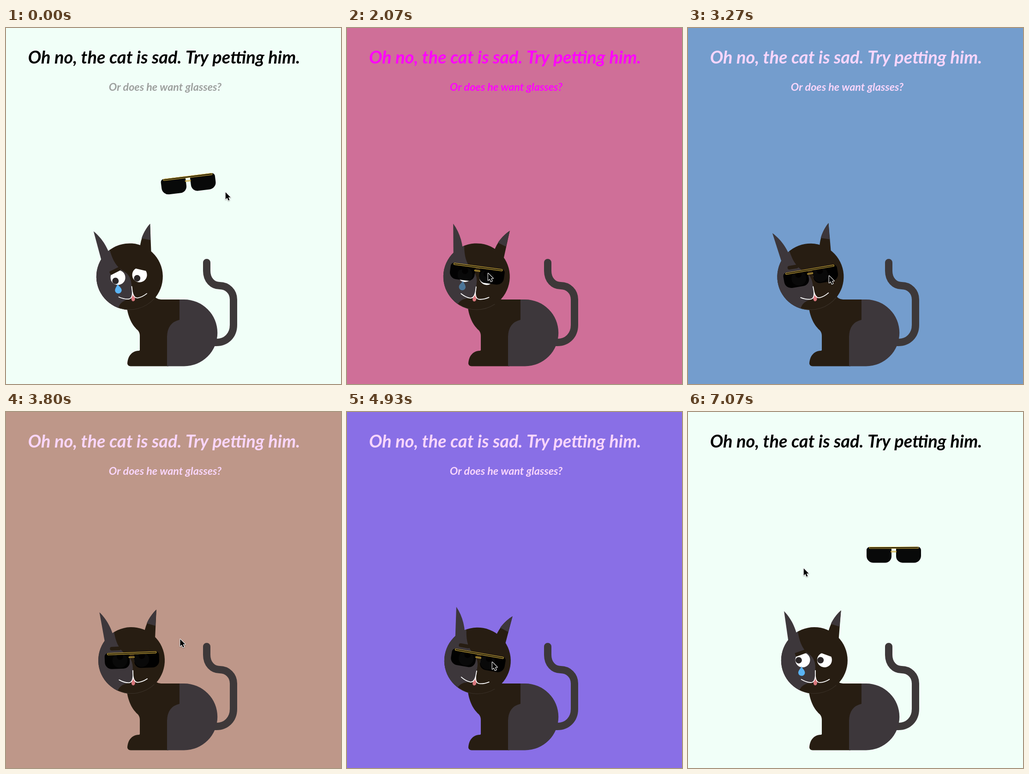
An HTML page with a canvas that plays this animation: 726 by 771 pixels, repeating every 7.14 s.

```html
<!DOCTYPE html>
<html lang="en">
<head>
<meta charset="utf-8">
<title>Sad cat</title>
<style>
html, body { margin: 0; width: 100%; height: 100%; overflow: hidden; background: #f1fff8; }
canvas { display: block; }
</style>
</head>
<body>
<canvas id="stage" width="726" height="771"></canvas>
<script>
const ctx = document.getElementById('stage').getContext('2d');
const LOOP = 7140, TURN = Math.PI * 2, DEG = Math.PI / 180;
const MINT = '#f1fff8', DARK = '#271d12', GREY = '#3d373b', GOLD = '#c9a53a';
const PIVOT = [274, 589];

// Background colours and the moment each one is reached.
const PARTY = [[1490, MINT], [2070, '#cf6f98'], [2600, '#ff78a9'], [3270, '#749dcd'],
  [4270, '#ff914d'], [4930, '#896fe6'], [5860, MINT]];

// Pointer moves: begin, end, destination.
const MOVES = [[0, 560, 425, 332], [820, 1480, 305, 536], [3500, 4200, 486, 423],
  [4330, 4900, 314, 541], [5270, 5850, 485, 312], [6100, 7050, 250, 338]];

const lerp = (a, b, u) => a + (b - a) * u;
const ramp = (t, from, to) => Math.min(1, Math.max(0, (t - from) / (to - from)));
const smooth = u => u * u * (3 - 2 * u);
const glide = (t, from, to) => smooth(ramp(t, from, to));
const during = (t, a, b, c, d) => glide(t, a, b) - glide(t, c, d);

// cubic-bezier(.25, .1, .25, 1)
function ease(x) {
  const curve = (s, p, q) => 3 * s * (1 - s) ** 2 * p + 3 * s * s * (1 - s) * q + s ** 3;
  let lo = 0, hi = 1;
  for (let i = 0; i < 20; i++) {
    const mid = (lo + hi) / 2;
    if (curve(mid, 0.25, 0.25) < x) lo = mid; else hi = mid;
  }
  return curve(lo, 0.1, 1);
}

// Rest, left, rest, right: one sway lasts three seconds.
function sway(t) {
  const q = ((t + 308) % 3000) / 750, i = Math.floor(q);
  const stop = n => -10 * Math.sin(n * Math.PI / 2);
  return lerp(stop(i), stop(i + 1), ease(q - i)) * DEG;
}

function mix(a, b, u) {
  const part = (hex, i) => parseInt(hex.slice(i, i + 2), 16);
  return '#' + [1, 3, 5].map(i => Math.round(lerp(part(a, i), part(b, i), u)).toString(16).padStart(2, '0')).join('');
}

function backColor(t) {
  return PARTY.reduce((color, [time, next], i) => i ? mix(color, next, ramp(t, PARTY[i - 1][0], time)) : next, MINT);
}

function textColor(t, calm) {
  const lively = mix('#ff00ff', '#f9d6fb', ramp(t, 2700, 3200));
  return mix(calm, lively, during(t, 1500, 1750, 5450, 5850));
}

function fill(d, color) {
  ctx.fillStyle = color;
  ctx.fill(new Path2D(d));
}

function line(d, color, width) {
  ctx.strokeStyle = color;
  ctx.lineWidth = width;
  ctx.stroke(new Path2D(d));
}

function disc(x, y, r, color) {
  ctx.fillStyle = color;
  ctx.beginPath();
  ctx.arc(x, y, r, 0, TURN);
  ctx.fill();
}

function box(x, y, w, h, radii, color) {
  ctx.fillStyle = color;
  ctx.beginPath();
  ctx.roundRect(x, y, w, h, radii);
  ctx.fill();
}

function within(x, y, r, draw) {
  ctx.save();
  ctx.beginPath();
  ctx.arc(x, y, r, 0, TURN);
  ctx.clip();
  draw();
  ctx.restore();
}

function placed(x, y, angle, draw) {
  ctx.save();
  ctx.translate(x, y);
  ctx.rotate(angle);
  draw();
  ctx.restore();
}

function text(str, x, y, size, color) {
  ctx.font = `italic 700 ${size}px Lato, "Open Sans", sans-serif`;
  ctx.textAlign = 'center';
  ctx.fillStyle = color;
  ctx.fillText(str, x, y);
}

function pose(t) {
  const worn = during(t, 820, 1480, 5270, 5850);
  return {
    angle: sway(t),
    worn,
    slip: -5.5 * worn * (1 - glide(t, 2150, 2500)),
    cheer: during(t, 2000, 2500, 5450, 5850),
    tear: 1 - during(t, 1500, 2650, 5450, 5850),
    gaze: (135 + 45 * t / LOOP + 115 * worn) * DEG
  };
}

function drawBody() {
  line('M435 508V526C435 546 448 558 463 558C480 558 493 571 493 588V643C493 666 477 681 456 681H440', '#3d3839', 16);
  fill('M262 590V606C266 632 276 646 286 655Q290 660 290 667V697Q290 699 287 699C272 700 264 711 263 727Q264 732 270 732.5H352V680L378 640V588H336Q325 588 318 576Z', DARK);
  fill('M376 588H386A72 72 0 0 1 386 732.5H349V668Q350 638 376 632Z', GREY);
}

function drawEye(x, side, { gaze, cheer }) {
  disc(x, 537, 16, '#fff');
  within(x, 537, 16, () => disc(x + 8.7 * Math.cos(gaze), 537.5 + 8.7 * Math.sin(gaze), 7, '#2b2627'));
  placed(x - side * (4.5 + 4 * cheer), 522 - 11 * cheer, -20 * side * DEG * (1 - cheer),
    () => box(-12, -4, 24, 8, 1 + 3 * cheer, DARK));
}

function drawHead(p) {
  placed(...PIVOT, p.angle, () => {
    ctx.translate(-PIVOT[0], -PIVOT[1]);
    fill('M332 430C318 442 308 460 304 478L327 490Z', DARK);
    fill('M332 430C322 439 314 450 310 459L328.5 465Z', GREY);
    disc(274, 538, 72, DARK);
    within(274, 538, 72, () =>
      fill('M200 460H237C239 490 245 511 262 524Q276 534 276 552V586C259 586 246 590 241 604L200 620Z', GREY));
    line('M321 592A72 72 0 0 1 244 603', '#3b3229', 1);
    fill('M208.5 431C226 449 237 474 239 500L218 498Z', GREY);
    drawEye(248.7, 1, p);
    drawEye(296, -1, p);
    ctx.globalAlpha = p.tear;
    fill('M246 550.5C248 556 253.5 559 253.5 565A7.3 7.3 0 0 1 239 565C239 559 244.5 556 246 550.5Z', '#5ab4f5');
    ctx.globalAlpha = 1;
    fill('M276 573L280 585Q280 592 275.7 592Q271.5 592 272 585Z', '#d9777c');
    line('M276 560V571Q275 586 266 586Q256 585.5 245.5 579M276 571Q277 586 286 586Q296 585.5 306.5 579', '#fff', 1.8);
  });
}

function drawGlasses(t, { angle, worn, slip }) {
  const [freeX, freeY] = t < LOOP / 2 ? [395.5, 337.5] : [446, 309];
  const x = lerp(freeX, PIVOT[0] + 1 + 51.5 * Math.sin(angle), worn);
  const y = lerp(freeY, PIVOT[1] - 51.5 * Math.cos(angle), worn) + slip;
  placed(x, y, angle, () => {
    const glass = 'rgba(0,0,0,0.965)';
    box(-59, -17, 54, 34.5, [7, 4, 14, 15], glass);
    box(5, -17, 54, 34.5, [4, 7, 15, 14], glass);
    box(-53, -16.6, 106.5, 3.2, 1.5, '#15120a');
    ctx.strokeStyle = GOLD;
    ctx.lineWidth = 1.2;
    ctx.beginPath();
    ctx.roundRect(-53, -16.6, 106.5, 3.2, 1.5);
    ctx.roundRect(-6.5, -7.6, 12, 2, 1);
    ctx.stroke();
  });
}

function drawPointer(t, { slip }) {
  let x = 475, y = 355;
  for (const [from, to, nextX, nextY] of MOVES) {
    const u = glide(t, from, to);
    x = lerp(x, nextX, u);
    y = lerp(y, nextY, u);
  }
  placed(x, y + slip, 0, () => {
    const d = 'M.8 .8V16L4.3 12.7L6.8 18.5L9.4 17.4L7 11.7H11.7Z';
    ctx.shadowColor = 'rgba(0,0,0,0.35)';
    ctx.shadowBlur = 2;
    ctx.shadowOffsetY = 1;
    line(d, '#fff', 2.2);
    ctx.shadowColor = 'transparent';
    fill(d, '#000');
  });
}

function draw(t) {
  const p = pose(t);
  ctx.fillStyle = backColor(t);
  ctx.fillRect(0, 0, 726, 771);
  text('Oh no, the cat is sad. Try petting him.', 342.5, 77, 38, textColor(t, '#000000'));
  ctx.globalAlpha = 1 - ramp(t, 5450, 5850);
  text('Or does he want glasses?', 345, 136, 23.3, textColor(t, '#9da09e'));
  ctx.globalAlpha = 1;
  drawBody();
  drawHead(p);
  drawGlasses(t, p);
  drawPointer(t, p);
}

ctx.lineCap = 'round';
ctx.lineJoin = 'round';
const start = performance.now();
function tick() {
  draw((performance.now() - start) % LOOP);
  requestAnimationFrame(tick);
}
tick();
</script>
</body>
</html>
```
